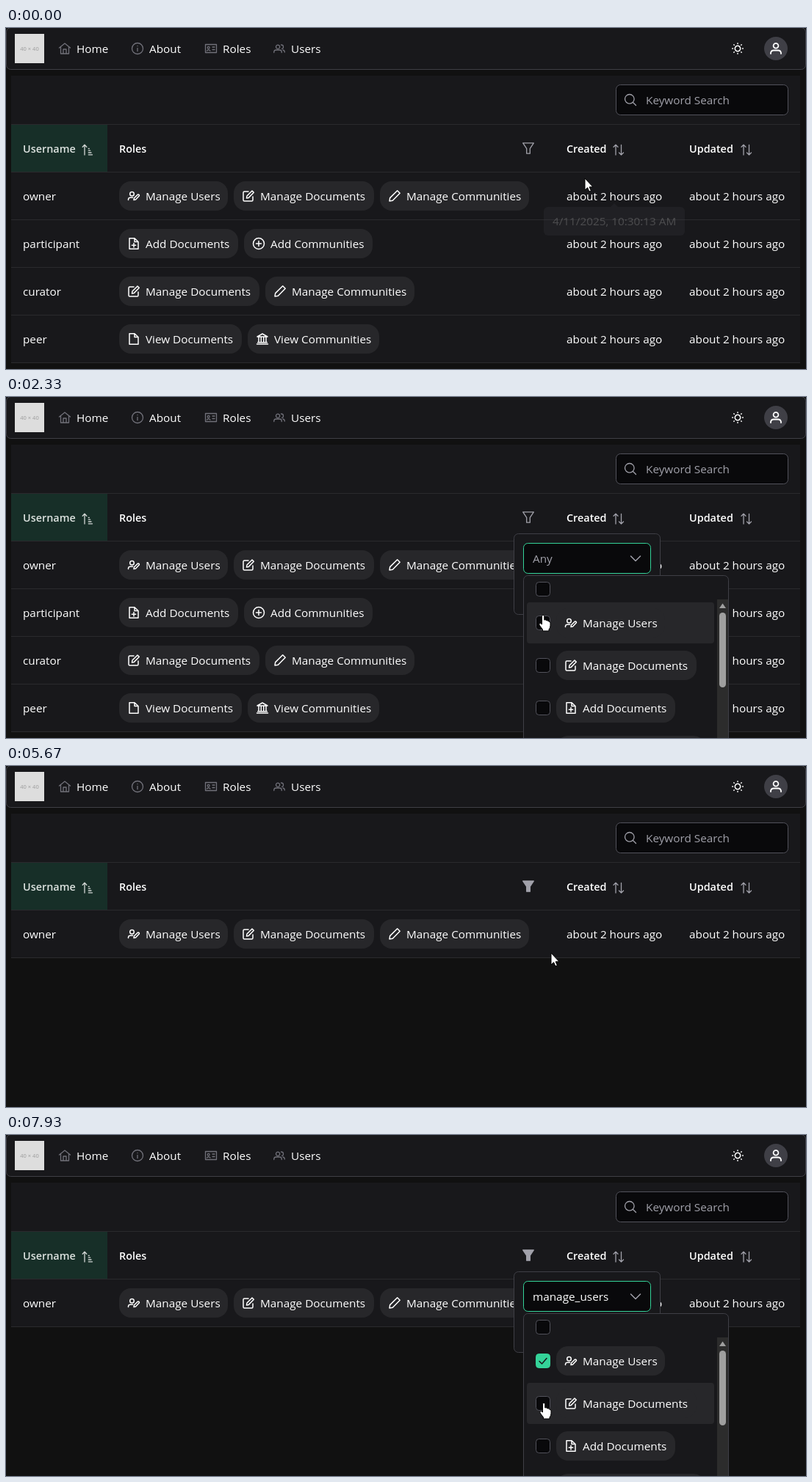
These frames come from a looping animation (1089x465 px, 8 s). An HTML page:

```html
<!DOCTYPE html>
<html lang="en">
<head>
<meta charset="utf-8">
<title>Role filter</title>
<style>
  html, body { margin: 0; width: 100%; height: 100%; overflow: hidden; background: #111; }
  svg { display: block; width: 1089px; height: 465px; }
  text { font: 15.3px "Open Sans", "Noto Sans", sans-serif; fill: #fff; white-space: pre; }
  .head { font-size: 14.4px; font-weight: 600; }
  .muted { fill: #a1a1aa; }
  .icon { fill: none; stroke: #fff; stroke-width: 1.5; stroke-linecap: round; stroke-linejoin: round; }
  #panel, #list { transform-box: fill-box; transform-origin: center top; }
</style>
</head>
<body>
<svg id="stage" viewBox="0 0 1089 465"></svg>
<script>
const LOOP = 8000, TICK = 1000 / 15;

// Icon paths, centred on 0,0
const ICONS = {
  home: 'M-7.5 -1L0 -7 7.5 -1M-5.5 -2.5V7H5.5V-2.5M-2 7V1H2V7',
  info: 'M-7.5 0a7.5 7.5 0 1 0 15 0a7.5 7.5 0 1 0 -15 0M0 -3.7V-3.5M0 -.5V3.7',
  card: 'M-7.5 -5.5H7.5V5.5H-7.5ZM-4.8 -1.2a1.5 1.5 0 1 0 3 0a1.5 1.5 0 1 0 -3 0M-5.5 3Q-3.3 .8 -1 3M2 -2H5M2 1.5H5',
  people: 'M-4.5 -2.2a2.6 2.6 0 1 0 5.2 0a2.6 2.6 0 1 0 -5.2 0M-7.2 5.5V4.5Q-7 2 -4.5 2H.5Q3 2 3.2 4.5V5.5M2.5 -5Q5.5 -5 5.5 -2.3T3.5 .3M5 2Q7.3 2.4 7.3 5',
  person: 'M-3.4 -3.7a3.4 3.4 0 1 0 6.8 0a3.4 3.4 0 1 0 -6.8 0M-7 7V6Q-6.5 2.5 -3 2.5H3Q6.5 2.5 7 6V7',
  personEdit: 'M-5.3 -2.8a2.8 2.8 0 1 0 5.6 0a2.8 2.8 0 1 0 -5.6 0M-7.5 5.5V4.5Q-7.2 2.2 -5 2.2H-1.5M0 5.5L.4 3 5.5 -2Q7.5 -2.2 7.4 -.2L2.5 5Z',
  penSquare: 'M0 -6H-5.5Q-7 -6 -7 -4.5V5.5Q-7 7 -5.5 7H4.5Q6 7 6 5.5V1M-2.5 3L-2 0 5 -7 7.3 -4.7 .3 2.4Z',
  pencil: 'M-7 7L-6.3 2.6 3.7 -7.2 7.2 -3.7 -2.6 6.3Z',
  fileAdd: 'M-6 -7.2H1L6 -2.5V7.2H-6ZM1 -7V-2.5H5.5M0 -.5V5M-2.7 2.2H2.7',
  plus: 'M-7.5 0a7.5 7.5 0 1 0 15 0a7.5 7.5 0 1 0 -15 0M0 -3.5V3.5M-3.5 0H3.5',
  file: 'M-6 -7.2H1L6 -2.5V7.2H-6ZM1 -7V-2.5H5.5',
  bank: 'M-7 -3L0 -7 7 -3ZM-5 -2.5V4.5M-1.7 -2.5V4.5M1.7 -2.5V4.5M5 -2.5V4.5M-6.3 4.7H6.3M-7.5 7H7.5',
  sort: 'M-4 7V-6.5M-7 -3.7L-4 -6.7 -1 -3.7M3.5 -6.5V7M.5 4L3.5 7 6.5 4',
  sorted: 'M-4 7V-6.5M-6.8 -3.7L-4 -6.7 -1.2 -3.7M1.3 -1.5H2.2M1.3 1.2H3.7M1.3 4H5M1.3 6.8H6.5',
  funnel: 'M-7.3 -7.2H7.3L2.3 .3V7.2H-2.3V.3Z',
  sun: 'M-3.7 0a3.7 3.7 0 1 0 7.4 0a3.7 3.7 0 1 0 -7.4 0M0 -7.3V-6.5M0 6.5V7.3M-7.3 0H-6.5M6.5 0H7.3M-5.2 -5.2L-4.7 -4.7M4.7 4.7L5.2 5.2M-5.2 5.2L-4.7 4.7M4.7 -4.7L5.2 -5.2',
  search: 'M-7.5 -1.2a6.3 6.3 0 1 0 12.6 0a6.3 6.3 0 1 0 -12.6 0M3.5 3.5L7.5 7.5'
};

const icon = (name, x, y, attrs = '') =>
  `<path class="icon" d="${ICONS[name]}" transform="translate(${x} ${y})" ${attrs}/>`;
const text = (s, x, y, cls = '', attrs = '') => `<text class="${cls}" x="${x}" y="${y}" ${attrs}>${s}</text>`;
const rect = (x, y, w, h, fill, r = 0, attrs = '') =>
  `<rect x="${x}" y="${y}" width="${w}" height="${h}" rx="${r}" fill="${fill}" ${attrs}/>`;
const framed = (x, y, w, h, fill, stroke, r, attrs = '') =>
  rect(x + .5, y + .5, w - 1, h - 1, fill, r, `stroke="${stroke}" ${attrs}`);
const rule = y => rect(7, y, 1074, 1, '#2a2a2d');

// Role: label, icon, chip width
const ROLES = {
  mu: ['Manage Users', 'personEdit', 148],
  md: ['Manage Documents', 'penSquare', 191],
  mc: ['Manage Communities', 'pencil', 203],
  ad: ['Add Documents', 'fileAdd', 162],
  ac: ['Add Communities', 'plus', 175],
  vd: ['View Documents', 'file', 167],
  vc: ['View Communities', 'bank', 179]
};

function chip(key, x, y) {
  const [label, glyph, w] = ROLES[key];
  return rect(x, y, w, 40, '#27272a', 16) + icon(glyph, x + 20, y + 20) + text(label, x + 36, y + 26);
}

function tableRow([name, ...roles], i) {
  const y = 197 + i * 65;
  let x = 154, out = rect(7, y, 1074, 64, '#18181b') + rule(y + 64) + text(name, 23, y + 38);
  for (const key of roles) {
    out += chip(key, x, y + 12);
    x += ROLES[key][2] + 8;
  }
  return out + [763, 930].map(cx => text('about 2 hours ago', cx, y + 38)).join('');
}

const ROWS = [
  ['owner', 'mu', 'md', 'mc'],
  ['participant', 'ad', 'ac'],
  ['curator', 'md', 'mc'],
  ['peer', 'vd', 'vc']
];

const NAV = [['Home', 'home', 80, 96], ['About', 'info', 179, 195], ['Roles', 'card', 279, 295], ['Users', 'people', 372, 388]];

const header =
  framed(0, -1, 1089, 58, '#18181b', '#3f3f46', 6) +
  rect(12, 8, 40, 40, '#ddd') + text('40 × 40', 32, 31, '', 'text-anchor="middle" style="font-size:7.5px;fill:#999"') +
  NAV.map(([label, glyph, ix, tx]) => icon(glyph, ix, 28, 'style="stroke:#71717a;stroke-width:1.3"') + text(label, tx, 34)).join('') +
  icon('sun', 996, 28) +
  '<circle cx="1048" cy="28" r="16" fill="#3f3f46"/>' + icon('person', 1048, 28, 'style="stroke-width:1.8"');

const grey = 'style="stroke:#a1a1aa;stroke-width:1.3"';
const tableHead =
  rect(7, 65, 1074, 132, '#18181b') + rule(131) + rect(7, 132, 131, 64, '#172f28') + rule(196) +
  framed(830, 77, 235, 42, '#09090b', '#52525b', 6) + icon('search', 850, 98, grey) +
  text('Keyword Search', 871, 104, 'muted') +
  text('Username', 23, 170, 'head', 'style="fill:#dde3e0"') + icon('sorted', 111, 166, 'style="stroke:#d4d8d6;stroke-width:1.3"') +
  text('Roles', 154, 170, 'head') +
  '<circle id="halo" cx="711" cy="164" r="20" fill="#202023"/>' + icon('funnel', 711, 164, grey + ' id="funnel"') +
  text('Created', 763, 170, 'head') + icon('sort', 834, 166, grey) +
  text('Updated', 930, 170, 'head') + icon('sort', 1008, 166, grey);

const tooltip = '<g id="tip" opacity=".22">' + rect(732, 244, 192, 39, '#3f3f46', 6) +
  '<path d="M823 244L828 239 833 244Z" fill="#3f3f46"/>' + text('4/11/2025, 10:30:13 AM', 744, 269) + '</g>';

const panel = '<g id="panel">' +
  framed(691, 186, 200, 111, '#18181b', '#3f3f46', 6) +
  framed(704, 199, 174, 42, '#09090b', '#52525b', 6, 'id="select"') +
  text('Any', 717, 226, 'muted', 'id="value"') +
  '<path class="icon" d="M850.5 217L857 223.5 863.5 217" style="stroke:#a1a1aa"/>' +
  rect(704, 249, 59, 35, '#34d399', 6, 'id="apply"') +
  text('Apply', 714.5, 272, '', 'style="font-size:14px;font-weight:500;fill:#09090b"') + '</g>';

const box = (y, attrs = '') => framed(721, y, 20, 20, '#09090b', '#52525b', 4, attrs);
const list = '<g id="list">' +
  framed(704, 243, 280, 240, '#18181b', '#3f3f46', 6) + box(252) +
  rect(709, 280, 255, 56, '#27272a', 4, 'id="hover"') +
  ['mu', 'md', 'ad', 'mc'].map((key, i) => chip(key, 749, 288 + i * 58) + box(298 + i * 58, i ? '' : 'id="check"')).join('') +
  '<path id="tick" class="icon" d="M726 308.5L729.5 312 736 304.5" style="stroke:#18181b"/>' +
  rect(968, 276, 15, 200, '#2c2c2c') + '<path d="M971 288H980L975.5 281.5Z" fill="#9f9f9f"/>' +
  rect(971, 294, 9, 102, '#9f9f9f', 4.5) + '</g>';

const cursor = '<g id="cursor" fill="#fff" stroke="#000" stroke-linejoin="round">' +
  '<path id="arrow" d="M0 0V16L3.6 12.7 5.9 18 8.4 17 6.2 11.8H11Z"/>' +
  '<path id="hand" d="M-1.5 1.5Q0 -1 1.8 1.5V7Q4.5 6 5 8Q7.3 7.2 7.8 9.2Q10 9 10 11V15Q9.8 18 8 20V22H-.5V20L-5 14Q-6 11.5 -3.5 11.5L-1.5 13Z"/></g>';

const stage = document.getElementById('stage');
stage.innerHTML = header + tableHead + tableRow(ROWS[0], 0) +
  '<g id="rest">' + ROWS.slice(1).map((r, i) => tableRow(r, i + 1)).join('') + '</g>' +
  tooltip + panel + list + cursor;
const el = {};
stage.querySelectorAll('[id]').forEach(node => el[node.id] = node);

// Pointer: time, x, y
const PATH = [
  [0, 788, 205], [70, 787, 203], [470, 713, 167], [800, 712, 167], [930, 722, 182],
  [1130, 728, 235], [1330, 727, 270], [1530, 727, 272], [1600, 726, 242], [1730, 728, 224],
  [1930, 728, 224], [2400, 731, 309], [2800, 731, 309], [3200, 701, 275], [3400, 701, 275],
  [3600, 704, 270], [3900, 700, 276], [4200, 698, 281], [4270, 695, 281], [4400, 695, 281],
  [4530, 702, 281], [4670, 702, 281], [4800, 709, 281], [4930, 722, 273], [5130, 724, 271],
  [5470, 742, 265], [5600, 742, 265], [5670, 742, 255], [5930, 780, 205], [6330, 716, 167],
  [6530, 714, 166], [6670, 748, 196], [6870, 744, 222], [7270, 744, 224], [7870, 732, 364], [8000, 733, 367]
];

const clamp = v => Math.max(0, Math.min(1, v));
const ramp = (t, start, span) => clamp((t - start) / span);
const pulse = (t, on, off, inSpan, outSpan) => ramp(t, on, inSpan) * (1 - ramp(t, off, outSpan));
const mix = (a, b, k) => `rgb(${a.map((v, i) => Math.round(v + (b[i] - v) * k))})`;
const inside = (x, y, x0, y0, x1, y1) => x >= x0 && x < x1 && y >= y0 && y < y1;
const GREY = [82, 82, 91], GREEN = [52, 211, 153], MINT = [110, 231, 183];

function pointer(t) {
  const i = PATH.findIndex(p => p[0] > t);
  const [t0, x0, y0] = PATH[i - 1], [t1, x1, y1] = PATH[i];
  const k = (t - t0) / (t1 - t0);
  return [x0 + (x1 - x0) * k, y0 + (y1 - y0) * k];
}

function reveal(node, k, opening) {
  node.style.display = k > 0 ? '' : 'none';
  node.style.opacity = k;
  node.style.transform = opening ? `scaleY(${.8 + .2 * k})` : '';
}

function draw(t) {
  const [x, y] = pointer(t);
  const filtered = t >= 5190, checked = t >= 2590;
  const panelShow = pulse(t, 600, 5120, 130, 100) + ramp(t, 6480, 130);
  const listShow = pulse(t, 1800, 4640, 130, 90) + ramp(t, 7200, 130);

  el.tip.style.display = t < 60 ? '' : 'none';
  el.rest.style.display = filtered ? 'none' : '';
  el.funnel.style.fill = filtered ? '#a1a1aa' : 'none';
  el.halo.style.opacity = pulse(t, 400, 800, 200, 200) + pulse(t, 6390, 6600, 130, 200);

  reveal(el.panel, panelShow, t < 1000 || t > 6000);
  reveal(el.list, listShow, t < 2500 || t > 6000);

  const focus = pulse(t, 660, 3720, 200, 200) + ramp(t, 6590, 200);
  el.select.style.stroke = mix(GREY, GREEN, focus);
  el.value.textContent = checked ? 'manage_users' : 'Any';
  el.value.style.fill = checked ? '#fff' : '#a1a1aa';
  const warm = pulse(t, 1200, 1600, 200, 200) + pulse(t, 4800, 5250, 200, 100);
  el.apply.style.fill = mix(GREEN, MINT, warm);

  el.check.style.fill = checked ? '#34d399' : '#09090b';
  el.check.style.stroke = checked ? '#34d399' : '#52525b';
  el.tick.style.display = checked ? '' : 'none';
  const secondRow = t > 7000 && y >= 337;
  el.hover.setAttribute('y', secondRow ? 338 : 280);
  el.hover.style.display = checked || y >= 280 ? '' : 'none';

  const hand = Math.hypot(x - 711, y - 164) < 20 ||
    panelShow > 0 && inside(x, y, 704, 199, 878, 241) ||
    panelShow > 0 && listShow <= 0 && inside(x, y, 704, 249, 763, 284) ||
    listShow > 0 && inside(x, y, 709, 280, 964, 465);
  el.arrow.style.display = hand ? 'none' : '';
  el.hand.style.display = hand ? '' : 'none';
  el.cursor.setAttribute('transform', `translate(${Math.round(x)} ${Math.round(y)})`);
}

const origin = performance.now();
function frame() {
  const t = (performance.now() - origin) % LOOP;
  draw(Math.min(Math.floor((t + 5) / TICK) * TICK, LOOP - 1));
  requestAnimationFrame(frame);
}
frame();
</script>
</body>
</html>
```
